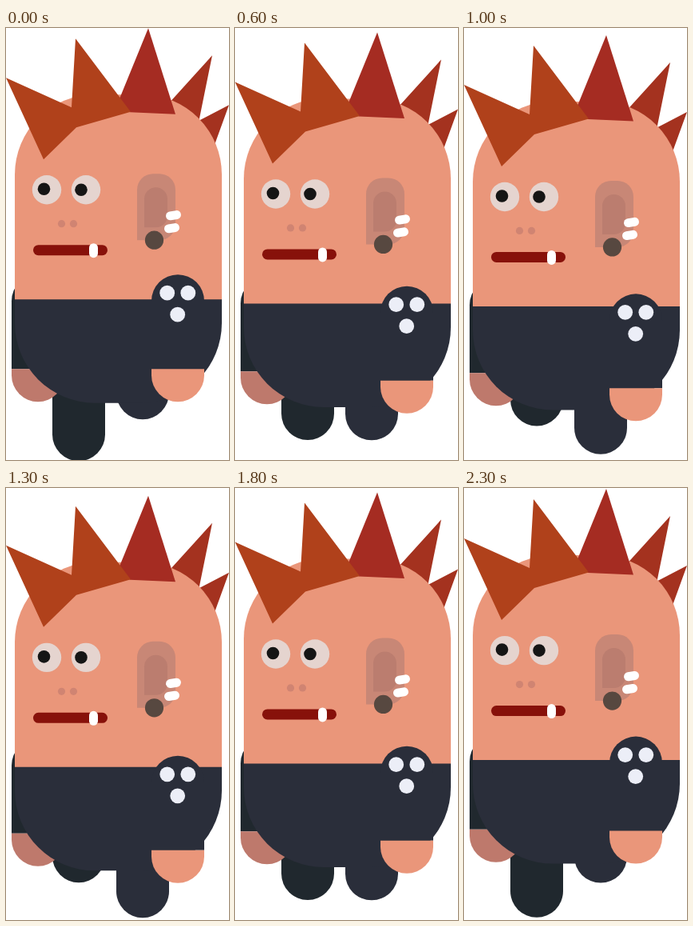
Write an HTML page that moves like this. It is 279 px wide and 540 px high and loops after 2400 ms.

```html
<!DOCTYPE html>
<html lang="en">
<head>
<meta charset="utf-8">
<title>Walking punk</title>
<style>
html, body { margin: 0; width: 100%; height: 100%; overflow: hidden; background: #fff; }
svg { display: block; width: 279px; height: 540px; }
</style>
</head>
<body>
<svg viewBox="0 0 279 540">
  <defs>
    <clipPath id="torso"><rect x="11" y="83" width="259" height="385.5" rx="100"/></clipPath>
    <path id="sleeve" d="M0 118V33a33 33 0 0 1 66 0V118z"/>
    <path id="hand" d="M0 118H66V126a33 33 0 0 1-66 0z"/>
    <rect id="leg" width="66" height="150" rx="33"/>
    <rect id="stud" x="-9.5" y="-5.5" width="19" height="11" rx="5.5" fill="#fff" transform="rotate(-9)"/>
  </defs>

  <use id="farLeg" href="#leg" fill="#20282e"/>
  <g id="farArm">
    <use href="#sleeve" fill="#20282e"/>
    <use href="#hand" fill="#be796c"/>
  </g>
  <use id="nearLeg" href="#leg" fill="#2a2e3a"/>

  <g id="body">
    <path fill="#a4321f" d="M258 34L190 109 232 162zM279 96L225 124 255 162z"/>
    <g clip-path="url(#torso)">
      <path fill="#ea967a" d="M0 70H279V345H0z"/>
      <path fill="#2a2e3a" d="M0 339H279V480H0z"/>
    </g>
    <path fill="#a52c22" d="M178 0L140 93 155 105 212 107.5z"/>
    <path fill="#b0411b" d="M0 62L82 99 87 13 156 104.5 88 124 47 164z"/>

    <g fill="#e5d4cf"><circle cx="51" cy="202" r="18.2"/><circle cx="100" cy="202" r="18.2"/></g>
    <g fill="#151515"><circle cx="47.5" cy="201" r="7.8"/><circle cx="94" cy="202" r="7.8"/></g>
    <g fill="#d08472"><circle cx="69.5" cy="244.5" r="4.6"/><circle cx="84.5" cy="244.5" r="4.6"/></g>
    <rect x="34" y="271" width="93" height="13" rx="6.5" fill="#87110a"/>
    <rect x="104" y="269" width="11" height="18" rx="5.5" fill="#fff"/>

    <path fill="#c88776" d="M164 265V202a20 20 0 0 1 20-20H192a20 20 0 0 1 20 20V245a20 20 0 0 1-20 20z"/>
    <path fill="#bb7d6f" d="M173 249V213.500a14.500 14.500 0 0 1 29 0V234.500a14.500 14.500 0 0 1-14.500 14.500z"/>
    <circle cx="185.5" cy="265" r="11.6" fill="#574840"/>
    <use href="#stud" x="0" y="0" transform="translate(209.500 234)"/>
    <use href="#stud" x="0" y="0" transform="translate(207.500 250)"/>
  </g>

  <g id="nearArm">
    <use href="#sleeve" fill="#2a2e3a"/>
    <use href="#hand" fill="#ea967a"/>
    <g fill="#eceef7">
      <circle cx="19.700" cy="23" r="9.4"/>
      <circle cx="45.800" cy="23" r="9.4"/>
      <circle cx="32.700" cy="50" r="9.4"/>
    </g>
  </g>
</svg>
<script>
const LOOP = 2400, STEP = 100, HALF = 12;

// id: x, y at the start, y at mid-loop
const parts = {
  body: [0, 0.2, 10.7],
  nearArm: [182, 308.2, 337.2],
  farArm: [7, 308.2, 314.2],
  nearLeg: [138, 339.2, 391.5],
  farLeg: [58, 391.2, 338.8]
};

const moves = Object.entries(parts).map(([id, pos]) => [document.getElementById(id), pos]);

function draw(ms) {
  const n = Math.floor((ms % LOOP) / STEP);
  const u = 1 - Math.abs(n - HALF) / HALF;
  for (const [el, [x, from, to]] of moves) {
    el.setAttribute('transform', `translate(${x} ${from + (to - from) * u})`);
  }
}

const start = performance.now();
function tick() {
  draw(performance.now() - start);
  requestAnimationFrame(tick);
}
tick();
</script>
</body>
</html>
```
